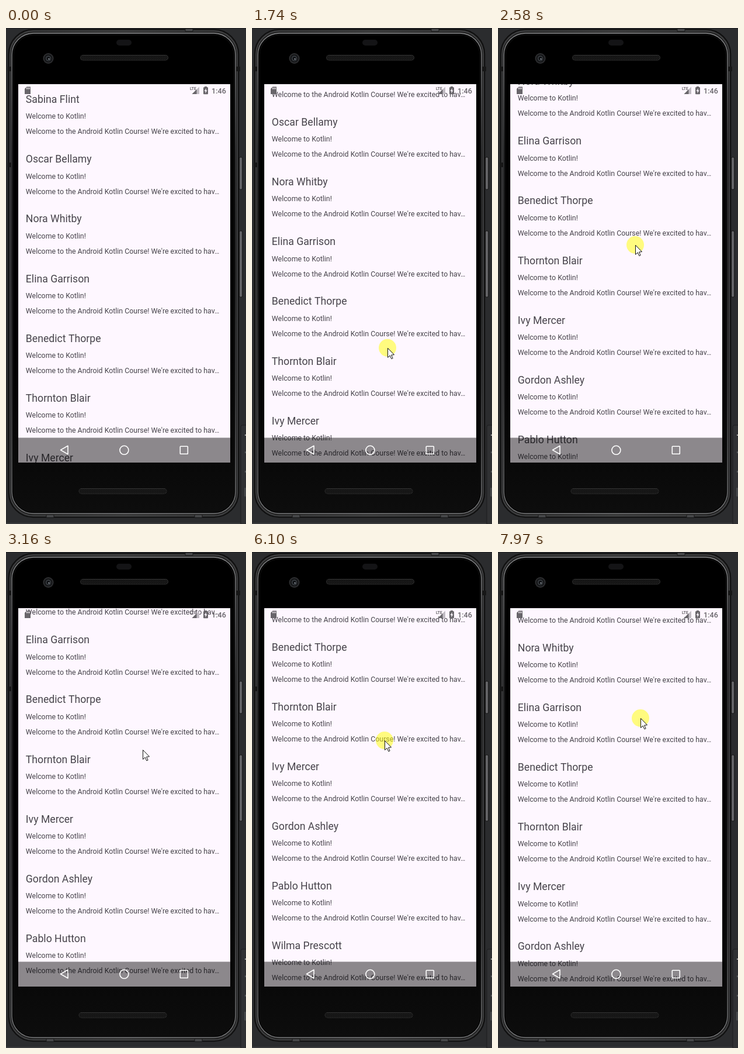
These frames come from a looping animation (411 by 848 pixels, 7990 ms). An HTML page with a canvas:

```html
<!DOCTYPE html>
<html lang="en">
<head>
<meta charset="utf-8">
<title>Scrolling inbox</title>
<style>
html, body { margin: 0; width: 100%; height: 100%; overflow: hidden; background: #2b2c2e; }
canvas { display: block; }
</style>
</head>
<body>
<canvas id="stage" width="411" height="848"></canvas>
<script>
const W = 411, H = 848, LOOP = 7990;
const SCREEN = { x: 21, y: 96, w: 363, h: 647 };
const ROW = 102.1;
const NAMES = ['Sabina Flint', 'Oscar Bellamy', 'Nora Whitby', 'Elina Garrison', 'Benedict Thorpe',
  'Thornton Blair', 'Ivy Mercer', 'Gordon Ashley', 'Pablo Hutton', 'Wilma Prescott'];
const TITLE = 'Welcome to Kotlin!';
const BODY = "Welcome to the Android Kotlin Course! We're excited to hav…";

// [time, value]
const SCROLL = [[1070, 0], [1200, 4], [1740, 63], [2580, 235], [2760, 268], [3300, 279], [4340, 279],
  [4500, 337], [4800, 383], [5850, 383], [6100, 368], [6910, 188], [7060, 168], [7480, 168], [7970, 162.5]];
// [time, x, y]
const POINTER = [[20, 346, 826], [570, 224, 626], [1070, 224, 626], [1740, 232, 547], [2580, 235, 371],
  [2740, 234, 338], [3470, 234, 338], [4190, 227, 516], [4340, 227, 516], [4500, 233, 442], [5100, 231, 304],
  [5660, 229, 301], [5850, 229, 301], [6100, 227, 322], [6910, 226, 489], [7040, 226, 510], [7090, 226, 510],
  [7430, 243, 262], [7480, 243, 262], [7970, 244, 284]];
const PRESSED = [[900, 2750], [4170, 7060], [7450, LOOP]];

const canvas = document.getElementById('stage');
const ctx = canvas.getContext('2d');

// Monotone cubic through the keys, held at both ends
function curve(keys, col = 1) {
  const n = keys.length - 1;
  const d = i => (keys[i + 1][col] - keys[i][col]) / (keys[i + 1][0] - keys[i][0]);
  const slope = keys.map((k, i) => {
    if (i === 0 || i === n) return 0;
    const a = d(i - 1), b = d(i);
    return a * b > 0 ? 2 * a * b / (a + b) : 0;
  });
  return t => {
    if (t <= keys[0][0]) return keys[0][col];
    if (t >= keys[n][0]) return keys[n][col];
    let i = 0;
    while (t >= keys[i + 1][0]) i++;
    const h = keys[i + 1][0] - keys[i][0], u = (t - keys[i][0]) / h, v = 1 - u;
    return keys[i][col] * (1 + 2 * u) * v * v + keys[i + 1][col] * (3 - 2 * u) * u * u +
      h * u * v * (slope[i] * v - slope[i + 1] * u);
  };
}
const scrollAt = curve(SCROLL), pointerX = curve(POINTER, 1), pointerY = curve(POINTER, 2);

function box(g, x, y, w, h, r, fill, stroke, line = 1) {
  g.beginPath();
  g.roundRect(x, y, w, h, r);
  if (fill) { g.fillStyle = fill; g.fill(); }
  if (stroke) { g.strokeStyle = stroke; g.lineWidth = line; g.stroke(); }
}

function disc(g, x, y, r, fill) {
  g.beginPath();
  g.arc(x, y, r, 0, 7);
  g.fillStyle = fill;
  g.fill();
}

function shape(g, pts) {
  g.beginPath();
  pts.forEach(([x, y]) => g.lineTo(x, y));
  g.closePath();
}

function shade(g, x0, y0, x1, y1, ...colors) {
  const grad = g.createLinearGradient(x0, y0, x1, y1);
  colors.forEach((c, i) => grad.addColorStop(i / (colors.length - 1), c));
  return grad;
}

function grille(g, x, y, w, h) {
  box(g, x, y, w, h, 4, '#242424', '#3b3b3b');
  g.save();
  g.clip();
  g.strokeStyle = '#0b0b0b';
  g.lineWidth = 0.9;
  g.beginPath();
  for (let i = -h; i < w + h; i += 3) {
    g.moveTo(x + i, y);
    g.lineTo(x + i + h, y + h);
    g.moveTo(x + i + h, y);
    g.lineTo(x + i, y + h);
  }
  g.stroke();
  g.restore();
}

function drawPhone(g) {
  g.fillStyle = '#2b2c2e';
  g.fillRect(0, 0, W, H);
  g.fillStyle = '#1d1e20';
  g.fillRect(0, 0, W, 1);
  g.fillStyle = '#3a3b3d';
  g.fillRect(0, 846, W, 2);
  box(g, 402, 679, 20, 180, 3, '#303133', '#1c1d1f');
  g.fillStyle = '#a8a8a8';
  g.fillRect(409, 695, 2, 2);
  g.fillStyle = '#55585a';
  [724, 757].forEach(y => g.fillRect(409, y, 2, 3));
  box(g, 408, 786, 6, 15, 1, '#47494b');

  // side keys
  [[221, 55], [347, 113]].forEach(([y, h]) =>
    box(g, 399, y, 6, h, 2, shade(g, 399, 0, 405, 0, '#222', '#77777a', '#3c3c3e'), '#161616'));

  // frame
  box(g, 4.5, 2.5, 394, 834, 42, shade(g, 4, 0, 399, 0, '#202020', '#343434', '#202020'), '#0c0c0c', 1.5);
  box(g, 7, 5, 389, 829, 40, null, '#47484a', 1.4);
  g.fillStyle = '#171717';
  [[3, 66], [3, 230], [394, 66]].forEach(([x, y]) => g.fillRect(x, y, 7, 8));
  [[307, 1], [69, 832], [323, 832]].forEach(([x, y]) => box(g, x, y, 13, 5, 1, '#48494b', '#171717'));

  // glass
  box(g, 10, 9, 383, 821, 37, '#050505', shade(g, 0, 9, 0, 830, '#88898b', '#353638', '#272829', '#404143', '#77787a'), 1.5);
  box(g, 13, 12, 377, 815, 34, shade(g, 0, 12, 0, 827, '#000', '#000', '#000', '#0d0d0d'), '#111');

  box(g, 189, 20, 26, 10, 5, '#141416');
  disc(g, 72.5, 52, 9, '#303133');
  disc(g, 72.5, 52, 7.3, '#17181a');
  disc(g, 72.5, 52, 4.5, '#3c4045');
  disc(g, 72.5, 52, 3, '#101114');
  disc(g, 73.5, 53, 1.2, '#8d949b');
  grille(g, 127.5, 46.5, 150, 8.5);
  grille(g, 125, 787.5, 150, 8.5);
}

function drawList(scroll) {
  ctx.fillStyle = '#fef7ff';
  ctx.fillRect(SCREEN.x, SCREEN.y, SCREEN.w, SCREEN.h);
  ctx.fillStyle = '#47444b';
  NAMES.forEach((name, i) => {
    const y = 128.2 + i * ROW - scroll;
    if (y < 0 || y > 770) return;
    ctx.font = '17.66px Roboto, sans-serif';
    ctx.fillText(name, 33.8, y);
    ctx.font = '12.36px Roboto, sans-serif';
    ctx.fillText(TITLE, 33.8, y + 27.2);
    ctx.fillText(BODY, 33.8, y + 53.2);
  });
}

function drawStatus() {
  const gray = '#68656a';
  ctx.fillStyle = gray;
  shape(ctx, [[35.5, 100.5], [42, 100.5], [42, 113], [32, 113], [32, 104]]);
  ctx.fill();
  ctx.fillStyle = '#fef7ff';
  [35, 37.3, 39.6].forEach(x => ctx.fillRect(x, 102, 1.2, 2.6));

  ctx.fillStyle = '#c1bcc3';
  shape(ctx, [[331, 100.5], [331, 113], [318.5, 113]]);
  ctx.fill();
  ctx.fillStyle = gray;
  shape(ctx, [[326.5, 105], [326.5, 113], [318.5, 113]]);
  ctx.fill();
  ctx.font = '700 6.5px Roboto, sans-serif';
  ctx.fillText('LTE', 315, 105.5);

  ctx.fillRect(340, 100, 4, 2);
  box(ctx, 338, 101.2, 8, 12, 1, gray);
  ctx.fillStyle = '#fef7ff';
  shape(ctx, [[342.7, 103], [339.6, 108], [341.5, 108], [341.3, 111.7], [344.5, 106.5], [342.5, 106.5]]);
  ctx.fill();

  ctx.fillStyle = gray;
  ctx.font = '500 12.6px Roboto, sans-serif';
  ctx.fillText('1:46', 352, 111.6);
}

function drawNav() {
  ctx.fillStyle = 'rgba(0,0,0,.45)';
  ctx.fillRect(SCREEN.x, 700.5, SCREEN.w, 42.5);
  ctx.strokeStyle = '#fff';
  ctx.lineWidth = 1.6;
  ctx.lineJoin = 'round';
  shape(ctx, [[93.5, 721.5], [106, 714.3], [106, 728.8]]);
  ctx.stroke();
  ctx.beginPath();
  ctx.arc(202.4, 721.8, 7.5, 0, 7);
  ctx.stroke();
  box(ctx, 298.3, 715.2, 13, 13, 0.8, null, '#fff', 1.6);
}

function drawPointer(t) {
  if (t < 20) return;
  const x = pointerX(t), y = pointerY(t);
  if (PRESSED.some(([a, b]) => t >= a && t < b)) disc(ctx, x, y, 15, 'rgba(255,255,0,.5)');
  ctx.save();
  ctx.translate(x + 0.5, y + 0.5);
  shape(ctx, [[0, 0], [0, 16], [3.7, 12.6], [6.3, 18.3], [8.6, 17.3], [6.1, 11.7], [11, 11.3]]);
  ctx.fillStyle = '#fff';
  ctx.fill();
  ctx.strokeStyle = '#111';
  ctx.lineWidth = 1;
  ctx.lineJoin = 'miter';
  ctx.stroke();
  ctx.restore();
}

const phone = document.createElement('canvas');
phone.width = W;
phone.height = H;
drawPhone(phone.getContext('2d'));

function draw(t) {
  ctx.drawImage(phone, 0, 0);
  ctx.save();
  ctx.beginPath();
  ctx.rect(SCREEN.x, SCREEN.y, SCREEN.w, SCREEN.h);
  ctx.clip();
  drawList(scrollAt(t));
  drawStatus();
  drawNav();
  ctx.restore();
  drawPointer(t);
}

const start = performance.now();
function tick() {
  draw((performance.now() - start) % LOOP);
  requestAnimationFrame(tick);
}
tick();
</script>
</body>
</html>
```
